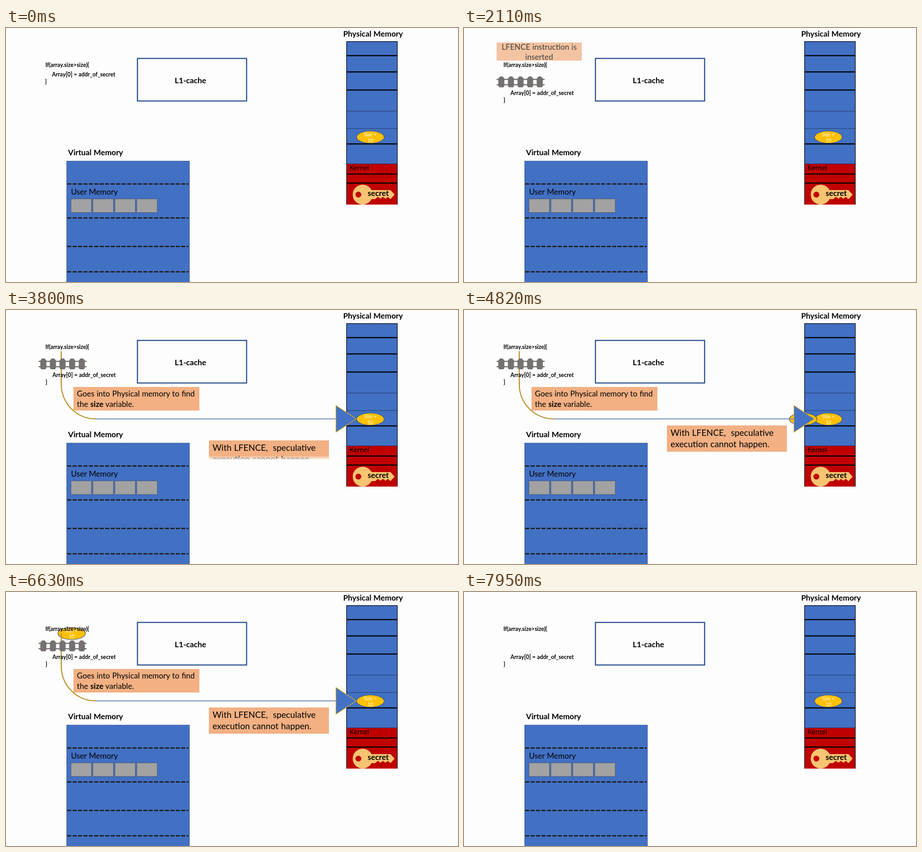
Write an HTML page that moves like this. It is 998 by 561 pixels and loops after 7.99 s.

```html
<!DOCTYPE html>
<html lang="en">
<head>
<meta charset="utf-8">
<title>Memory fence</title>
<style>
  html, body { margin: 0; width: 100%; height: 100%; overflow: hidden; background: #fdfdfd; }
  svg { display: block; width: 100vw; height: 100vh; }
  text { font-family: Lato, "Open Sans", sans-serif; font-size: 17.2px; word-spacing: .03em; white-space: pre; }
  .b { font-weight: 700; }
  .code { font-size: 12.3px; font-weight: 700; }
  .big { font-size: 19.2px; }
  .tiny { font-size: 10.8px; fill: #fff; text-anchor: middle; }
  .mid { text-anchor: middle; }
</style>
</head>
<body>
<svg viewBox="0 0 998 561">
  <defs>
    <g id="oval">
      <ellipse rx="30.5" ry="13.5" fill="#ffc000" stroke="#2f528f" stroke-width="1.2"/>
      <text class="tiny" y="-2.5">Size =</text>
      <text class="tiny" y="10.8">10</text>
    </g>
    <path id="post" d="M0 4.5 L4 0 H9.5 L13.5 4.5 V22 H12 V24 H1.5 V22 H0Z"/>
    <path id="wire" d="M122 91 V164 A76 76.5 0 0 0 198 240.5"/>
    <path id="route" d="M804.5 241 H360 C258 235 145 176 145 91.5"/>
  </defs>

  <text class="b" x="744.5" y="19">Physical Memory</text>
  <rect x="752" y="30" width="112" height="270" fill="#4270c3"/>
  <rect x="752" y="300" width="112" height="90" fill="#c00000"/>
  <path d="M752 183.5 h112 M752 222 h112 M752 300 h112" stroke="#1f3763"/>
  <path id="bars" stroke="#000" stroke-width="2.5"/>
  <path d="M752 390 V30 H864 V390" fill="none" stroke="#0a1020" stroke-width="1.4"/>
  <text x="758.5" y="313.5" style="font-size:15.2px">Kernel</text>
  <g fill="#f8c471">
    <circle cx="787.5" cy="368" r="22"/>
    <path d="M800 358 H849 L858 368 L849 378 L843 373 L838 377 L832 373 L827 377 L821 373 L815 378 H800Z"/>
    <circle cx="778" cy="368" r="6.5" fill="#c00000"/>
  </g>
  <text class="b" x="798.5" y="371">secret</text>
  <use href="#oval" x="804.5" y="241"/>

  <rect x="290.2" y="67.2" width="241" height="94" fill="none" stroke="#2f528f" stroke-width="2.5"/>
  <text class="b" x="372.5" y="121.5">L1-cache</text>

  <text class="b" x="137" y="280.5">Virtual Memory</text>
  <rect x="134" y="294" width="271" height="280" fill="#4270c3" stroke="#2f528f"/>
  <path d="M135 344.5 H403 M135 419.5 H403 M135 482.5 H403 M135 538.5 H403"
        stroke="#202020" stroke-width="3" stroke-dasharray="9 3"/>
  <text x="143.5" y="368">User Memory</text>
  <g id="cells" fill="#a2a2a2" stroke="#4d5870"/>

  <g id="fx">
    <g id="notes"></g>
    <use id="mover" href="#oval"/>
    <g id="arrow" fill="none">
      <use href="#wire" stroke="#d2a02a" stroke-width="2.6"/>
      <use href="#wire" stroke="#8d8558" stroke-width=".8"/>
      <path d="M198 240.5 H729" stroke="#6f86bd" stroke-width="2.2"/>
      <path d="M728.5 211 V270 L773.5 240.5Z" fill="#4472c4" stroke="#d9a924" stroke-width="1.3"/>
    </g>
    <g id="fence" fill="#767171">
      <path d="M0 112.2 h106 v2.6 h-106z M0 124 h106 v2.6 h-106z"/>
    </g>
  </g>

  <text class="code" x="87" y="85.5">If(array.size&gt;size){</text>
  <g id="body">
    <text class="code" x="101.5" y="106.5">Array[0] = addr_of_secret</text>
    <text class="code" x="86.3" y="123">}</text>
  </g>
</svg>
<script>
const LOOP = 7990;
const $ = id => document.getElementById(id);
const clamp = x => Math.min(1, Math.max(0, x));
const span = (t, start, dur) => clamp((t - start) / dur);
const ease = p => p < .5 ? 2 * p * p : 1 - 2 * (1 - p) ** 2;

$('bars').setAttribute('d', [61, 97, 137, 256, 322.5, 342.5].map(y => `M752 ${y}h112`).join(''));
for (let i = 0; i < 4; i++)
  $('cells').innerHTML += `<rect x="${143.5 + i * 48.4}" y="377.5" width="45.3" height="30"/>`;
for (let i = 0; i < 5; i++)
  $('fence').innerHTML += `<use href="#post" x="${3.7 + i * 21.2}" y="107"/>`;

const notes = [
  { x: 72, y: 32, w: 188, h: 40, start: 0, hide: 2000,
    text: '<text class="mid" x="94" y="15.5">LFENCE instruction is</text><text class="mid" x="94" y="37.5">inserted</text>' },
  { x: 149, y: 170, w: 278, h: 52, start: 3020,
    text: '<text x="7.5" y="21">Goes into Physical memory to find</text><text x="7.5" y="43.5">the <tspan class="b">size</tspan> variable.</text>' },
  { x: 448, y: 255, w: 265, h: 58, start: 3553,
    text: '<text class="big" x="8" y="23">With LFENCE,  speculative</text><text class="big" x="8" y="48">execution cannot happen.</text>' }
];
notes.forEach((n, i) => {
  $('notes').innerHTML += `
    <linearGradient id="edge${i}" gradientUnits="userSpaceOnUse" x1="0" x2="0">
      <stop stop-color="#fff"/><stop offset="1" stop-color="#000"/>
    </linearGradient>
    <mask id="wipe${i}" maskUnits="userSpaceOnUse" x="0" y="0" width="${n.w}" height="${n.h}">
      <rect width="${n.w}" height="${n.h}" fill="url(#edge${i})"/>
    </mask>
    <g id="note${i}" mask="url(#wipe${i})">
      <rect width="${n.w}" height="${n.h}" fill="#f2b083"/>${n.text}
    </g>`;
});

// Slides up into place while a soft edge uncovers it from the top.
function peek(n, i, t) {
  const p = span(t, n.start, 500);
  const edge = p * (n.h + 30);
  const el = $('note' + i);
  el.setAttribute('transform', `translate(${n.x} ${n.y + 1.125 * n.h * (1 - p)})`);
  el.setAttribute('opacity', p === 0 ? 0 : n.hide ? 1 - span(t, n.hide, 440) : 1);
  $('edge' + i).setAttribute('y1', edge - 10);
  $('edge' + i).setAttribute('y2', edge);
}

const route = $('route');
const routeLength = route.getTotalLength();

function draw(t) {
  notes.forEach((n, i) => peek(n, i, t));

  const p = ease(span(t, 0, 2000));
  $('fence').setAttribute('transform', `translate(${-107 + 179 * p} 0)`);
  $('body').setAttribute('transform', `translate(${p} ${41 * p})`);

  $('arrow').setAttribute('opacity', span(t, 2510, 500));

  const q = ease(span(t, 4430, 2000));
  const at = route.getPointAtLength(q * routeLength);
  $('mover').setAttribute('transform', `translate(${at.x} ${at.y})`);
  $('mover').setAttribute('opacity', q > 0 ? 1 : 0);

  $('fx').setAttribute('opacity', 1 - span(t, 7440, 500));
}

function tick() {
  draw(performance.now() % LOOP);
  requestAnimationFrame(tick);
}
tick();
</script>
</body>
</html>
```
